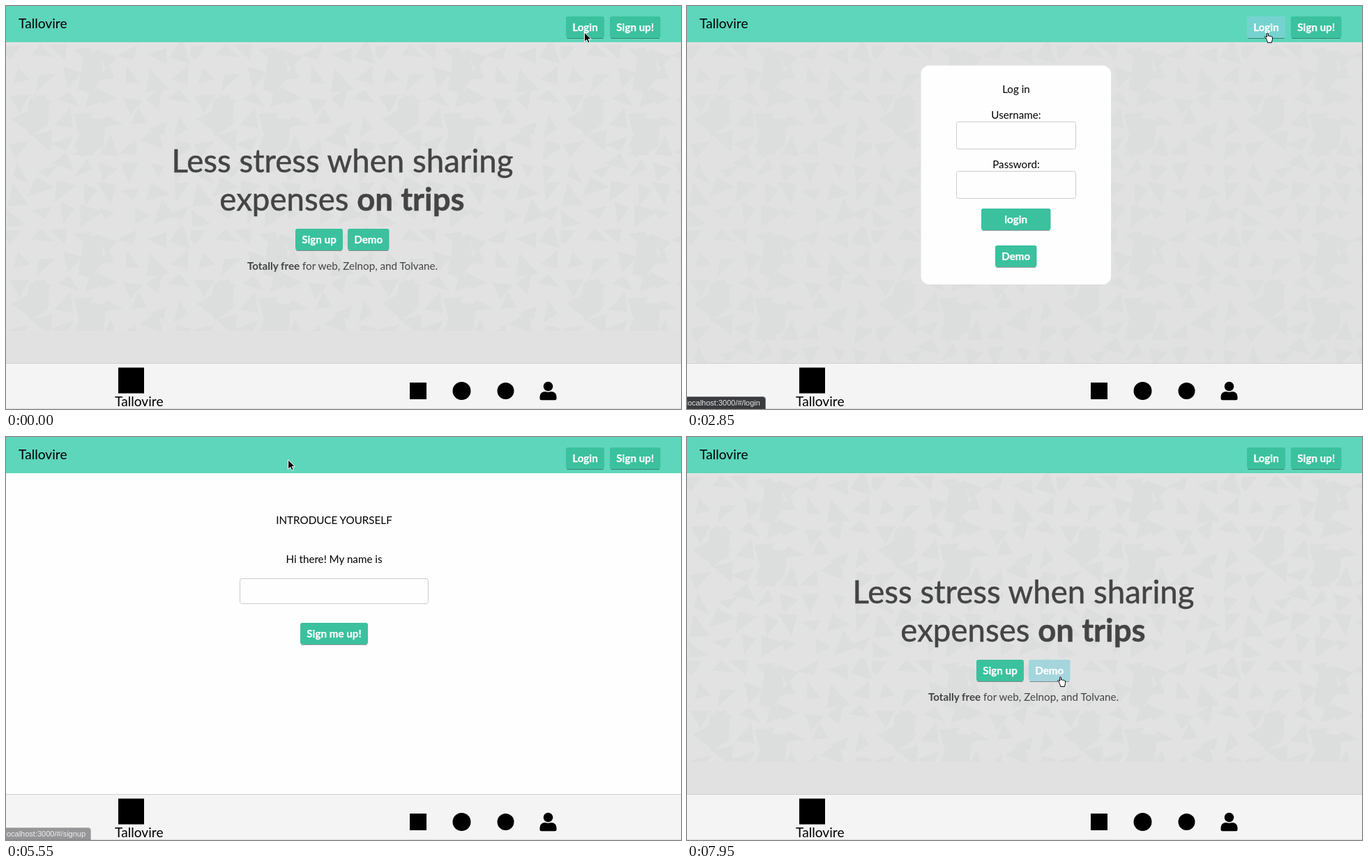
Write an HTML page that moves like this. It is 968 px wide and 579 px high and loops after 8 s.

```html
<!DOCTYPE html>
<html lang="en">
<head>
<meta charset="utf-8">
<title>Tallovire</title>
<style>
  html, body { margin: 0; height: 100%; overflow: hidden; }
  svg { display: block; width: 968px; height: 579px; font: 15.2px Lato, sans-serif; }
  .mid { text-anchor: middle; }
  .brand { font-size: 19.2px; }
  .headline { font-size: 45.6px; fill: #444; stroke: #444; stroke-width: .5px; }
  .bold { font-weight: 700; }
  .button rect { fill: #3bc19e; }
  .button path { stroke: #0006; }
  .button text { fill: #fff; stroke: #fff; stroke-width: .25px; font-weight: 700; text-anchor: middle; }
  .button.hover rect { fill: rgba(132, 209, 220, .64); }
  .input { fill: #fefefe; stroke: #ccc; }
  #status { font: 11px "Liberation Sans", Arial, sans-serif; }
</style>
</head>
<body>
<svg id="stage" viewBox="0 0 968 579"></svg>
<script>
const LOOP = 8000, STEP = 150, TILE = 265;
const stage = document.getElementById('stage');

const text = (x, y, content, cls = 'mid') => `<text x="${x}" y="${y}" class="${cls}">${content}</text>`;

const button = (x, y, w, label, id = '') => `<g class="button" id="${id}">
  <rect x="${x}" y="${y}" width="${w}" height="31" rx="3"/>
  <path d="M${x + 1.5} ${y + 31.5}h${w - 3}"/>
  ${text(x + w / 2, y + 21, label, '')}</g>`;

const input = (x, y, w, h) =>
  `<rect class="input" x="${x + .5}" y="${y + .5}" width="${w - 1}" height="${h - 1}" rx="3"/>`;

// Repeating tile of faint shards, plus three larger facets
function shards() {
  let seed = 11, d = 'M33 81 55 75 62 93 60 118 35 136 28 119Z' +
    'M112 18 134 10 140 50 120 73 103 68Z M116 108 144 112 140 150 108 166 98 150Z';
  const rand = () => (seed = seed * 16807 % 2147483647) / 2147483647;
  const cell = TILE / 8;
  for (let i = 0; i < 64; i++) {
    const cx = (i % 8 + .3 + rand() * .4) * cell, cy = ((i >> 3) + .3 + rand() * .4) * cell;
    const turn = rand() * 6.28;
    const corners = [0, 1.7, 3.6].map(a => {
      const r = 11 + rand() * 12;
      return `${(cx + r * Math.cos(turn + a)).toFixed(1)} ${(cy + r * Math.sin(turn + a)).toFixed(1)}`;
    });
    d += `M${corners.join(' ')}Z`;
  }
  return d;
}

stage.innerHTML = `
<defs><pattern id="shards" y="52" width="${TILE}" height="${TILE}" patternUnits="userSpaceOnUse">
  <path d="${shards()}" fill="#dcdedd"/></pattern></defs>
<rect width="968" height="579" fill="#fefefe"/>

<g id="home">
  <rect y="52" width="968" height="461" fill="#e2e2e2"/>
  <rect y="52" width="968" height="415" fill="url(#shards)"/>
  <rect y="467" width="968" height="46" fill="#e1e1e1"/>
  ${text(482.5, 238.5, 'Less stress when sharing', 'mid headline')}
  ${text(482, 293.5, 'expenses <tspan class="bold">on trips</tspan>', 'mid headline')}
  ${button(415, 320, 68, 'Sign up')}
  ${button(490, 320, 59.5, 'Demo', 'demo')}
  <g fill="#444">${text(482.5, 378.5, '<tspan class="bold">Totally free</tspan> for web, Zelnop, and Tolvane.')}</g>
</g>

<g id="login">
  <rect y="52" width="968" height="461" fill="#e1e1e1"/>
  <rect y="52" width="968" height="461" fill="url(#shards)"/>
  <rect x="335.5" y="85.5" width="272.5" height="314.5" rx="12" fill="#fefefe"/>
  ${text(472, 125, 'Log in')}
  ${text(472, 162, 'Username:')}${input(386, 166, 172, 40)}
  ${text(472, 233, 'Password:')}${input(386, 237, 172, 40)}
  ${button(422, 291, 99.5, 'login')}
  ${button(442, 344, 59.5, 'Demo')}
</g>

<g id="signup">
  ${text(470.5, 125, 'INTRODUCE YOURSELF')}
  ${text(470.5, 181, 'Hi there! My name is')}
  ${input(335, 203, 271, 37)}
  ${button(422, 267, 97, 'Sign me up!')}
</g>

<rect width="968" height="52" fill="#5ed6bb"/>
${text(18, 32, 'Tallovire', 'brand')}
${button(803, 15, 55, 'Login', 'navLogin')}
${button(866, 15, 72.5, 'Sign up!', 'navSignup')}

<rect y="513" width="968" height="66" fill="#f4f4f4"/>
<path d="M0 513.5H968" stroke="#d0d0d0"/>
<path d="M0 578.5H968" stroke="#ddd"/>
<rect x="161" y="519.5" width="37" height="37"/>
${text(156, 574.5, 'Tallovire', 'brand')}
<rect x="579" y="541" width="24" height="24"/>
<circle cx="653.5" cy="553" r="13"/>
<circle cx="716.5" cy="553" r="12"/>
<circle cx="777.5" cy="546.500" r="6.800"/>
<path d="M765.500 561.200a7.200 7.200 0 0 1 7.200-7.200h1q3.800 1.600 7.600 0h1a7.200 7.200 0 0 1 7.200 7.200v2.600a2.500 2.500 0 0 1-2.500 2.500h-19a2.500 2.500 0 0 1-2.500-2.500z"/>

<g id="status">
  <path id="statusBox" fill="#3a3b3e" stroke="#77787a"/>
  <text id="url" x="-1.5" y="574" fill="#e6e6e6"></text>
</g>
<path id="arrow" d="M0 0V13.500L3.200 10.600 5.300 15.300 7.600 14.300 5.600 9.700H9.800Z" fill="#000" stroke="#fff"/>
<path id="hand" fill="#fff" stroke="#000" stroke-linejoin="round"
  d="M-1.400 8-3.700 5.900C-4.400 5.200-3.300 4-2.400 4.700L-1 5.900V1C-1-.5 1-.5 1 1V4.200C1.200 3.400 2.800 3.400 3 4.500 3.400 3.800 4.800 4 5 5 5.400 4.400 7 4.600 7 6V8.700C7 10.700 6 11.200 6 13.600H.2C0 11.200-1.400 10.200-1.400 8Z"/>`;

const $ = id => document.getElementById(id);
const clamp = v => Math.max(0, Math.min(1, v));
const show = (id, on) => $(id).style.display = on ? '' : 'none';

// Pointer stops: time, x, y
const stops = [
  [0, 829.5, 38], [150, 829.5, 38], [300, 828.5, 38.5], [1200, 828.5, 38.5], [1350, 827.5, 39.5],
  [2700, 827.5, 39.5], [3750, 917, 31.5], [4950, 917, 31.5], [6000, 72, 33.5],
  [6750, 72, 33.5], [7800, 534, 353], [7950, 535.5, 345]
];

function pointerAt(t) {
  const next = stops.findIndex(s => s[0] >= t);
  if (next < 1) return stops[0].slice(1);
  const [t0, x0, y0] = stops[next - 1], [t1, x1, y1] = stops[next];
  const u = (t - t0) / (t1 - t0), e = u * u * (3 - 2 * u);
  return [x0 + (x1 - x0) * e, y0 + (y1 - y0) * e];
}

// Hover areas: id, left, top, right, bottom
const areas = [
  ['navLogin', 803, 15, 858, 47], ['navSignup', 866, 15, 938, 47],
  ['logo', 18, 12, 90, 42], ['demo', 490, 320, 549, 351]
];

function hoveredAt(t, page) {
  if (t < 300) return '';
  const [x, y] = pointerAt(t);
  const area = areas.find(([id, left, top, right, bottom]) =>
    (id !== 'demo' || page === 'home') && x >= left && x <= right && y >= top && y <= bottom);
  return area ? area[0] : '';
}

function statusAlpha(t) {
  const fade = (enter, leave) => Math.min(clamp((t - enter - 150) / 200), clamp((leave + 450 - t) / 300));
  return Math.max(fade(300, 5250), fade(6000, 6900));
}

function draw() {
  const t = Math.floor(performance.now() % LOOP / STEP) * STEP;
  const page = t < 1500 || t >= 6450 ? 'home' : t < 4800 ? 'login' : 'signup';
  for (const id of ['home', 'login', 'signup']) show(id, id === page);

  const hovered = hoveredAt(t, page);
  for (const id of ['navLogin', 'navSignup', 'demo']) $(id).classList.toggle('hover', id === hovered);
  for (const id of ['arrow', 'hand']) $(id).setAttribute('transform', `translate(${pointerAt(t)})`);
  show('arrow', !hovered);
  show('hand', hovered);

  const [path, width] = t < 3300 ? ['login', 113] : t < 6000 ? ['signup', 122] : ['', 90];
  $('url').textContent = 'localhost:3000/#/' + path;
  $('statusBox').setAttribute('d', `M-2 561.500H${width - 4}q3.500 0 3.500 3.500V581H-2Z`);
  $('status').style.opacity = statusAlpha(t);
  requestAnimationFrame(draw);
}
draw();
</script>
</body>
</html>
```
